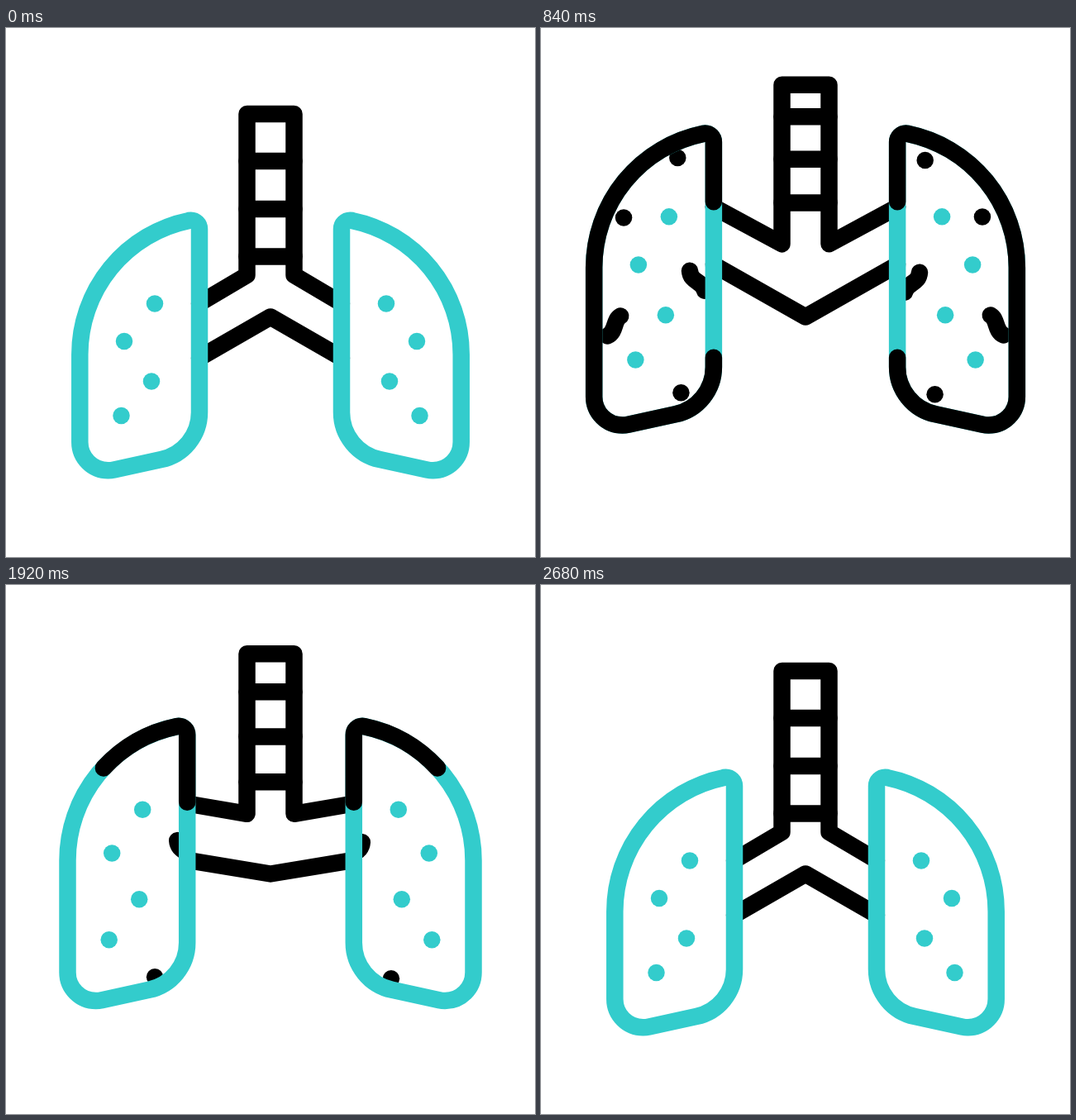
Write an HTML page with a canvas that moves like this. It is 640x640 px and loops after 2.8 s.

```html
<!DOCTYPE html>
<html lang="en">
<head>
<meta charset="utf-8">
<title>Breathing lungs</title>
<style>
  html, body { margin: 0; width: 100%; height: 100%; overflow: hidden; background: #fff; }
  canvas { display: block; width: 640px; height: 640px; }
</style>
</head>
<body>
<canvas id="stage" width="640" height="640"></canvas>
<script>
const ctx = document.getElementById('stage').getContext('2d');
const LOOP = 2800, TEAL = '#33cccc', BLACK = '#000', WIDTH = 20.5;
const rad = deg => deg * Math.PI / 180;
const clamp = x => Math.min(1, Math.max(0, x));

// cubic-bezier(a, 0, b, 1) solved by bisection
function ease(x, a, b) {
  x = clamp(x);
  let lo = 0, hi = 1;
  for (let i = 0; i < 24; i++) {
    const u = (lo + hi) / 2, v = 1 - u;
    if (3 * a * u * v * v + 3 * b * u * u * v + u * u * u < x) lo = u; else hi = u;
  }
  return lo * lo * (3 - 2 * lo);
}

// Fixed dots: x, y, rise on a full breath
const dots = [[180, 333.5, 107.5], [143, 379, 94.5], [176, 427.5, 82], [139.5, 469, 69]];

// Drifting specks: drift vector, then the position in each lung (right one mirrored)
const specks = [
  { drift: [-10, -38], at: [[170, 175], [180, 178]] },
  { drift: [-19, -20], at: [[109, 239], [115, 238]] },
  { drift: [20, 62], at: [[160, 412], [154, 414]] },
  { drift: [51, 29], at: [[156, 280], [158, 282]], curve: [1, 14, 15, 12, 18, 24] },
  { drift: [-44, 35], at: [[117, 332], [117, 331]], curve: [-9, 5, -5, 19, -16, 24] }
];

function lungPath(p) {
  const x = -25.7 * p, top = -107.5 * p, low = -56 * p, path = new Path2D();
  path.moveTo(234 + x, 465 + low);
  path.arc(223.7 + x, 243 + top, 10.3, 0, rad(-101.6), true);
  path.arc(254.7 + x, 395 + top, 165.4, rad(258.4), rad(180), true);
  path.arc(123.6 + x, 501 + low, 34.3, rad(180), rad(78), true);
  path.arc(175.7 + x, 465 + low, 58.3, rad(78), 0, true);
  path.closePath();
  return path;
}

function line(...pts) {
  ctx.beginPath();
  pts.forEach(([x, y]) => ctx.lineTo(x, y));
  ctx.stroke();
}

function disc(x, y) {
  ctx.beginPath();
  ctx.arc(x, y, WIDTH / 2, 0, 7);
  ctx.fill();
}

function drawAirway(p) {
  ctx.strokeStyle = BLACK;
  const x = 234 - 25.7 * p, top = 104 - 36 * p, fork = 299 - 38.5 * p;
  const upper = 333 - 119 * p, lower = 399 - 115 * p;
  line([x, upper], [291.5, fork], [291.5, top], [348.5, top], [348.5, fork], [640 - x, upper]);
  line([x, lower], [320, 349.5], [640 - x, lower]);
  [[161, 55], [219, 61.5], [276.5, 66.5]].forEach(([y, rise]) =>
    line([291.5, y - rise * p], [348.5, y - rise * p]));
}

function drawSpecks(side, spread) {
  ctx.fillStyle = ctx.strokeStyle = BLACK;
  for (const { drift, at, curve } of specks) {
    const x = at[side][0] + drift[0] * spread, y = at[side][1] + drift[1] * spread;
    if (!curve) { disc(x, y); continue; }
    ctx.beginPath();
    ctx.moveTo(x, y);
    ctx.bezierCurveTo(...curve.map((d, i) => d + (i % 2 ? y : x)));
    ctx.stroke();
  }
}

function drawLung(side, p, spread, start, length) {
  const path = lungPath(p), total = 771.5 + 103 * p;
  ctx.save();
  if (side) { ctx.translate(640, 0); ctx.scale(-1, 1); }
  if (spread < 2) {
    ctx.save();
    ctx.clip(path);
    drawSpecks(side, spread);
    ctx.restore();
  }
  ctx.fillStyle = ctx.strokeStyle = TEAL;
  dots.forEach(([x, y, rise]) => disc(x - 25.7 * p, y - rise * p));
  ctx.stroke(path);
  if (length > 0.0005) {
    ctx.strokeStyle = BLACK;
    if (length < 0.999) {
      ctx.setLineDash([length * total, (1 - length) * total]);
      ctx.lineDashOffset = -start * total;
    }
    ctx.stroke(path);
  }
  ctx.restore();
}

function draw(t) {
  const inhale = t < 1400;
  const breath = ease((t - 80) / 940, .58, .18) - ease((t - 1440) / 1240, .58, .18);
  const start = inhale ? -.107 + .541 * clamp((t - 120) / 1160)
                       : .427 - .518 * clamp((t - 1440) / 1120);
  const length = inhale ? ease((t - 120) / 1030, 1 / 3, 2 / 3)
                        : 1 - ease((t - 1440) / 1120, .1, .22);
  let spread = inhale ? 1.35 * (1 - clamp((t - 620) / 540)) ** 2
                      : Math.max(0, (t - 1440) / 480) ** 2;
  if (t < 620) spread = 2;

  ctx.fillStyle = '#fff';
  ctx.fillRect(0, 0, 640, 640);
  ctx.lineWidth = WIDTH;
  ctx.lineCap = ctx.lineJoin = 'round';
  drawAirway(breath);
  drawLung(0, breath, spread, start, length);
  drawLung(1, breath, spread, start, length);
}

const begin = performance.now();
function tick() {
  draw((performance.now() - begin) % LOOP);
  requestAnimationFrame(tick);
}
tick();
</script>
</body>
</html>
```
